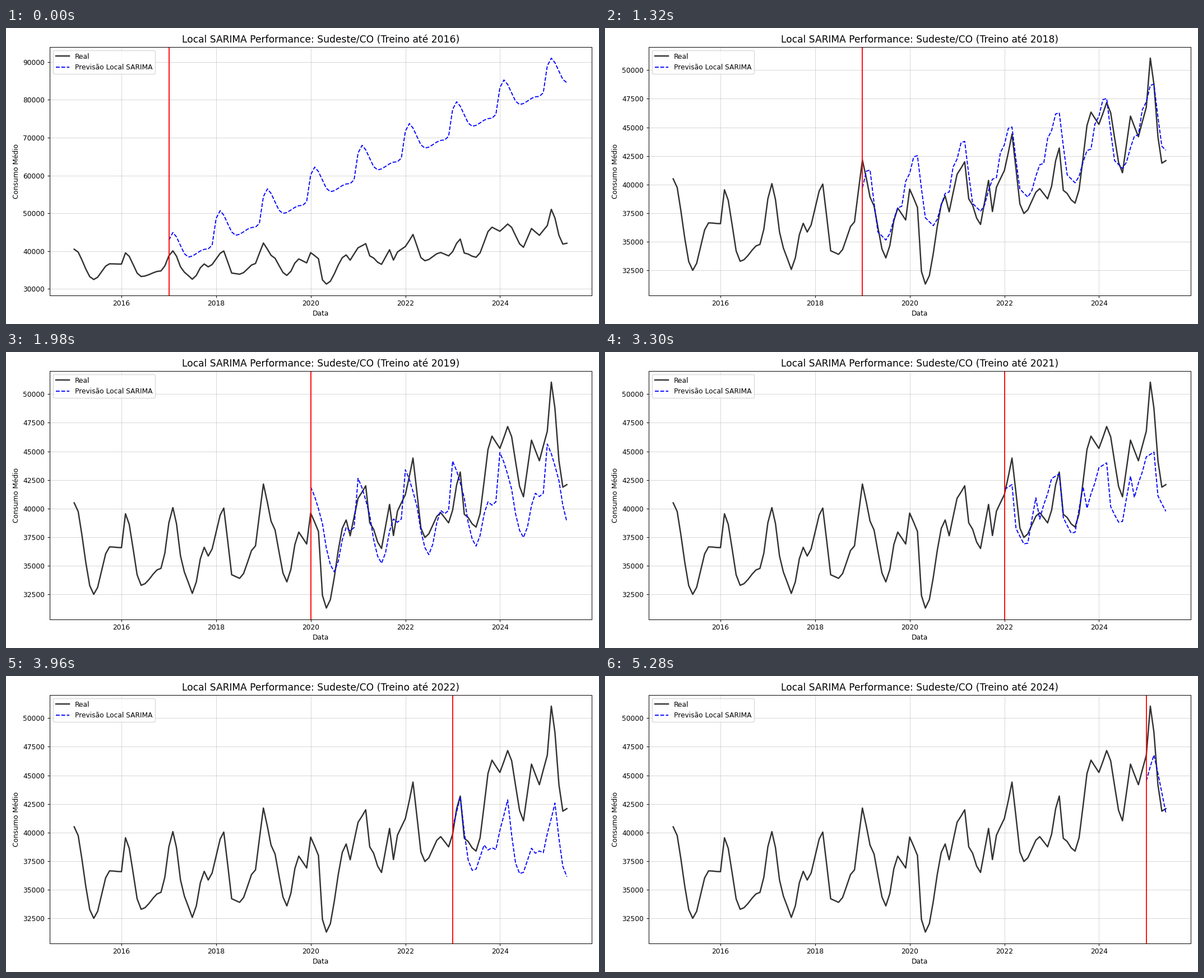
A matplotlib script that plays this animation: 1058x529 px, repeating every 5940 ms.

```python
import numpy as np
import matplotlib.pyplot as plt
from matplotlib.animation import FuncAnimation

plt.rcParams["font.family"] = "DejaVu Sans"
W, H = 1058, 529
FIRST_YEAR, N_MONTHS = 2015, 126
YEARS = range(2016, 2025)

# Turning points of each year: (month from 0, consumption in hundreds)
TURNS = {
    2015: [(0, 405), (5, 325), (9, 366.5)],
    2016: [(0, 365.8), (1, 395.4), (5, 332.9), (10, 347.7)],
    2017: [(1, 400.8), (4, 344.4), (6, 325.8), (9, 366.1), (10, 358.5)],
    2018: [(2, 400.4), (4, 342.1), (6, 339), (10, 367.4)],
    2019: [(0, 421.4), (2, 389), (6, 335.9), (9, 379.4), (11, 369)],
    2020: [(0, 396), (2, 380), (3, 324), (4, 313), (9, 390), (10, 376.2)],
    2021: [(0, 409), (2, 419.9), (3, 387.5), (6, 365.1), (8, 403.6), (9, 376.4), (10, 397.7)],
    2022: [(0, 412.2), (2, 444.1), (4, 383), (5, 374.7), (9, 396.4), (11, 387.5)],
    2023: [(2, 431.9), (3, 395), (6, 383.8), (10, 463.3)],
    2024: [(0, 452.6), (2, 471.7), (6, 410.3), (8, 459.8), (10, 441.8)],
    2025: [(0, 467.6), (1, 510.5), (4, 418.7), (5, 420.9)],
}

# Last training year: (step above the seasonal base, drift per year), in hundreds
TRENDS = {
    2016: (53.5, 57.6), 2017: (8, 7), 2018: (15.8, 12.5),
    2019: (8, 7.5), 2020: (17.6, 14.2), 2021: (11, 9.5),
    2022: (-6.7, -2.8), 2023: (69.2, 50.3), 2024: (6, 0),
}


def ease_through(points, t):
    """Cosine easing from each point to the next."""
    x, y = np.array(points).T
    k = np.clip(np.searchsorted(x, t, side="right") - 1, 0, len(x) - 2)
    u = (t - x[k]) / (x[k + 1] - x[k])
    return y[k] + (y[k + 1] - y[k]) * (1 - np.cos(np.pi * u)) / 2


t = np.arange(N_MONTHS)
dates = (np.datetime64(f"{FIRST_YEAR}-01") + t).astype("datetime64[D]")
points = [(12 * (year - FIRST_YEAR) + m, v) for year, turns in TURNS.items() for m, v in turns]
real = 100 * ease_through(points, t)


def forecast(year):
    """Repeat a blend of the last two known years, adding the drift."""
    start = 12 * (year + 1 - FIRST_YEAR)
    season = 0.75 * real[start - 12:start] + 0.25 * real[start - 24:start - 12]
    step, drift = TRENDS[year]
    i = np.arange(N_MONTHS - start)
    return dates[start:], season[i % 12] + 100 * (step + drift * (i // 12))


fig, ax = plt.subplots(figsize=(12, 6), dpi=88.16667)
fig.subplots_adjust(left=77.7 / W, right=1044.6 / W, bottom=1 - 477.8 / H, top=1 - 33.7 / H)


def draw(frame):
    year = YEARS[frame]
    ahead, values = forecast(year)
    ax.clear()
    ax.plot(dates, real, color="black", alpha=0.8, lw=2, label="Real")
    ax.plot(ahead, values, "--", color="blue", lw=1.5, label="Previsão Local SARIMA")
    ax.axvline(ahead[0], color="red", lw=1.5)
    ax.set_title(f"Local SARIMA Performance: Sudeste/CO (Treino até {year})", fontsize=14)
    ax.set_xlabel("Data")
    ax.set_ylabel("Consumo Médio")
    ax.legend(loc="upper left")
    ax.grid(True, alpha=0.5)


anim = FuncAnimation(fig, draw, frames=len(YEARS), interval=660, repeat=True, repeat_delay=0)
plt.show()
```
